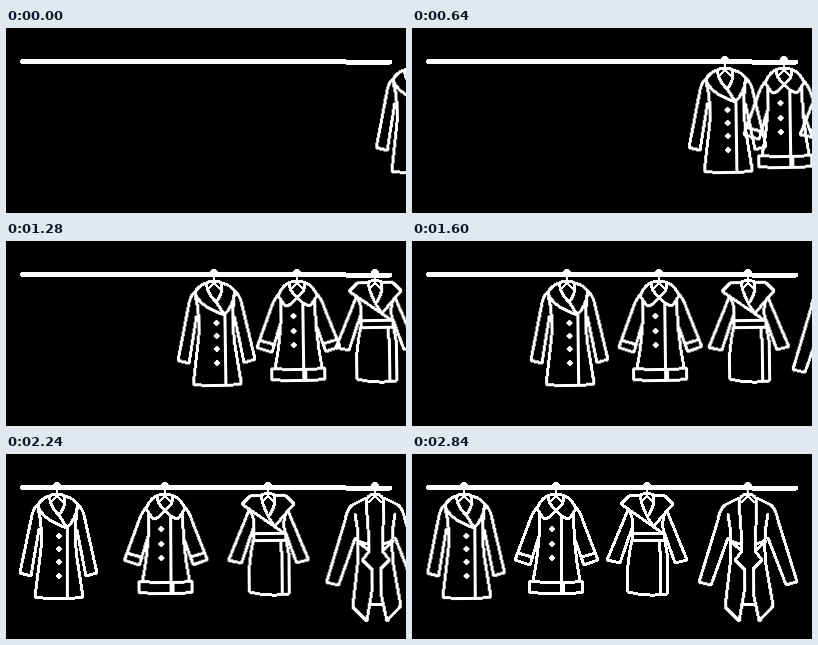
Animation of 400x185 px, one loop 2880 ms. Source, as an HTML page:

```html
<!DOCTYPE html>
<html lang="en">
<head>
<meta charset="utf-8">
<title>Coats on a rail</title>
<style>
  html, body { margin: 0; width: 100%; height: 100%; overflow: hidden; background: #000; }
  svg { display: block; width: 100%; height: 100%; shape-rendering: crispEdges; }
  .line { fill: none; stroke: #fff; stroke-width: 3; stroke-linecap: round; stroke-linejoin: round; }
  .rail { stroke: #fffaff; stroke-width: 5; }
  .solid { fill: #fff; stroke: none; }
  .coat { transform-origin: 0 32px; animation: 2880ms linear infinite; }
  #long { animation-name: slide-long; }
  #short { animation-name: slide-short; }
  #belted { animation-name: slide-belted; }
  #draped { animation-name: slide-draped; }

  /* Each coat trails slightly while sliding, then swings past its stop and settles. */
  @keyframes slide-long {
    0% { transform: translateX(406px) rotate(-1deg); }
    22.222% { transform: translateX(313px) rotate(-.8deg); }
    44.444% { transform: translateX(208px) rotate(-.8deg); }
    55.556% { transform: translateX(155px) rotate(-.7deg); }
    66.667% { transform: translateX(103px) rotate(-.5deg); }
    77.778% { transform: translateX(51px) rotate(0deg); animation-timing-function: ease-out; }
    80.556% { transform: translateX(49px) rotate(1.3deg); animation-timing-function: ease-in-out; }
    87.5%, 100% { transform: translateX(52px) rotate(-.4deg); }
  }
  @keyframes slide-short {
    0% { transform: translateX(446px) rotate(-1deg); }
    22.222% { transform: translateX(372px) rotate(-.8deg); }
    44.444% { transform: translateX(291px) rotate(-.8deg); }
    55.556% { transform: translateX(247px) rotate(-.7deg); }
    66.667% { transform: translateX(203px) rotate(-.6deg); }
    77.778% { transform: translateX(159px) rotate(-.4deg); }
    81.944% { transform: translateX(143px) rotate(0deg); animation-timing-function: ease-out; }
    84.722% { transform: translateX(141px) rotate(1.2deg); animation-timing-function: ease-in-out; }
    91.667%, 100% { transform: translateX(144px) rotate(0deg); }
  }
  @keyframes slide-belted {
    0% { transform: translateX(485px) rotate(-1deg); }
    44.444% { transform: translateX(369px) rotate(-.8deg); }
    55.556% { transform: translateX(336px) rotate(-.7deg); }
    66.667% { transform: translateX(300px) rotate(-.6deg); }
    77.778% { transform: translateX(262px) rotate(-.5deg); }
    86.111% { transform: translateX(234px) rotate(0deg); animation-timing-function: ease-out; }
    88.889% { transform: translateX(232px) rotate(1.1deg); animation-timing-function: ease-in-out; }
    95.833%, 100% { transform: translateX(235px) rotate(0deg); }
  }
  @keyframes slide-draped {
    0% { transform: translateX(570px) rotate(-.8deg); }
    55.556% { transform: translateX(429px) rotate(-.6deg); }
    66.667% { transform: translateX(399px) rotate(-.5deg); }
    77.778% { transform: translateX(369px) rotate(-.4deg); }
    90.278% { transform: translateX(335px) rotate(0deg); animation-timing-function: ease-out; }
    93.056% { transform: translateX(333px) rotate(.9deg); animation-timing-function: ease-in-out; }
    100% { transform: translateX(336px) rotate(-.3deg); }
  }
</style>
</head>
<body>
<svg viewBox="0 0 400 185" preserveAspectRatio="none">
  <defs>
    <g id="hanger" stroke-width="2">
      <path class="solid" d="M-4 32a4 4 0 0 1 8 0v3h-8z"/>
      <path d="M0 34V41M-6 48L0 42L6 48"/>
    </g>
    <circle id="button" class="solid" r="2.6"/>
  </defs>
  <path class="line rail" d="M16.5 33.3L383.5 34.1"/>

  <g id="long" class="coat line">
    <use href="#hanger"/>
    <path d="M-8 42Q-16 45 -19 51Q-16 65 10 74Q19 65 21 51Q18 45 8 42Q0 38 -8 42"/>
    <path d="M-8 42Q-6 54 2 61L10 74M8 42Q9 53 2 61"/>
    <path d="M-19 51Q-23 53 -25 61L-37 119L-26 122L-18 75"/>
    <path d="M21 51Q25 54 27 61L40 119L29 122L20 76"/>
    <path d="M-19 53Q-13 78 -17 103L-22 143Q2 147 26 143L20 104Q17 83 20 54M10 74V145"/>
    <use href="#button" x="2" y="82"/>
    <use href="#button" x="2" y="95"/>
    <use href="#button" x="2" y="108"/>
    <use href="#button" x="2" y="122"/>
  </g>

  <g id="short" class="coat line">
    <use href="#hanger"/>
    <path d="M-9 42Q-16 46 -19 55L-12 65Q-5 64 0 56Q6 64 13 65L20 55Q17 46 9 42Q0 38 -9 42"/>
    <path d="M-8 43Q-7 51 0 56Q8 51 8 43"/>
    <path d="M-18 53Q-23 57 -26 66L-41 106L-26 111L-17 82M-38 99L-24 103"/>
    <path d="M19 53Q24 57 27 67L42 106L28 111L18 83M39 99L26 103"/>
    <path d="M-17 60Q-15 86 -23 127M18 60Q17 89 24 127M5 61V128"/>
    <path d="M-26 127Q-12 129 5 128V140Q-13 140 -27 138ZM7 128Q16 129 26 127L27 138Q17 140 7 140Z"/>
    <use href="#button" x="-4" y="75"/>
    <use href="#button" x="-4" y="90"/>
    <use href="#button" x="-4" y="104"/>
  </g>

  <g id="belted" class="coat line">
    <use href="#hanger"/>
    <path d="M-7 41L-18 42L-26 50L14 78M7 41L18 42L26 50L6 73"/>
    <path d="M-7 41Q0 38 7 41Q8 52 1 62M-7 41Q-5 56 6 72"/>
    <path d="M-19 56L-40 106L-27 109L-15 74M20 57L40 106L28 109L16 75"/>
    <path d="M-17 58Q-12 70 -15 79H17Q14 69 18 59"/>
    <path d="M-15 79V86H18L17 79"/>
    <path d="M-15 86Q-21 111 -19 138Q0 143 20 140Q23 112 18 86M12 86Q15 112 13 141"/>
  </g>

  <g id="draped" class="coat line">
    <use href="#hanger"/>
    <path d="M-9 44L-23 51Q-28 55 -30 66L-49 128L-37 131L-20 84"/>
    <path d="M9 44L23 51Q28 55 30 66L49 128L38 131L20 84"/>
    <path d="M-20 60Q-15 85 -18 111L-23 153L-9 167L-4 138V114"/>
    <path d="M20 60Q15 85 18 111L25 152L11 167L5 138V114"/>
    <path d="M-6 95Q-7 70 -9 49Q-8 40 0 40Q8 40 9 49Q8 70 7 95"/>
    <path d="M-8 90L-18 87L-6 97L-13 106L-4 115M8 90L18 87L7 97L14 106L5 115M-5 150H6"/>
  </g>
</svg>
</body>
</html>
```
